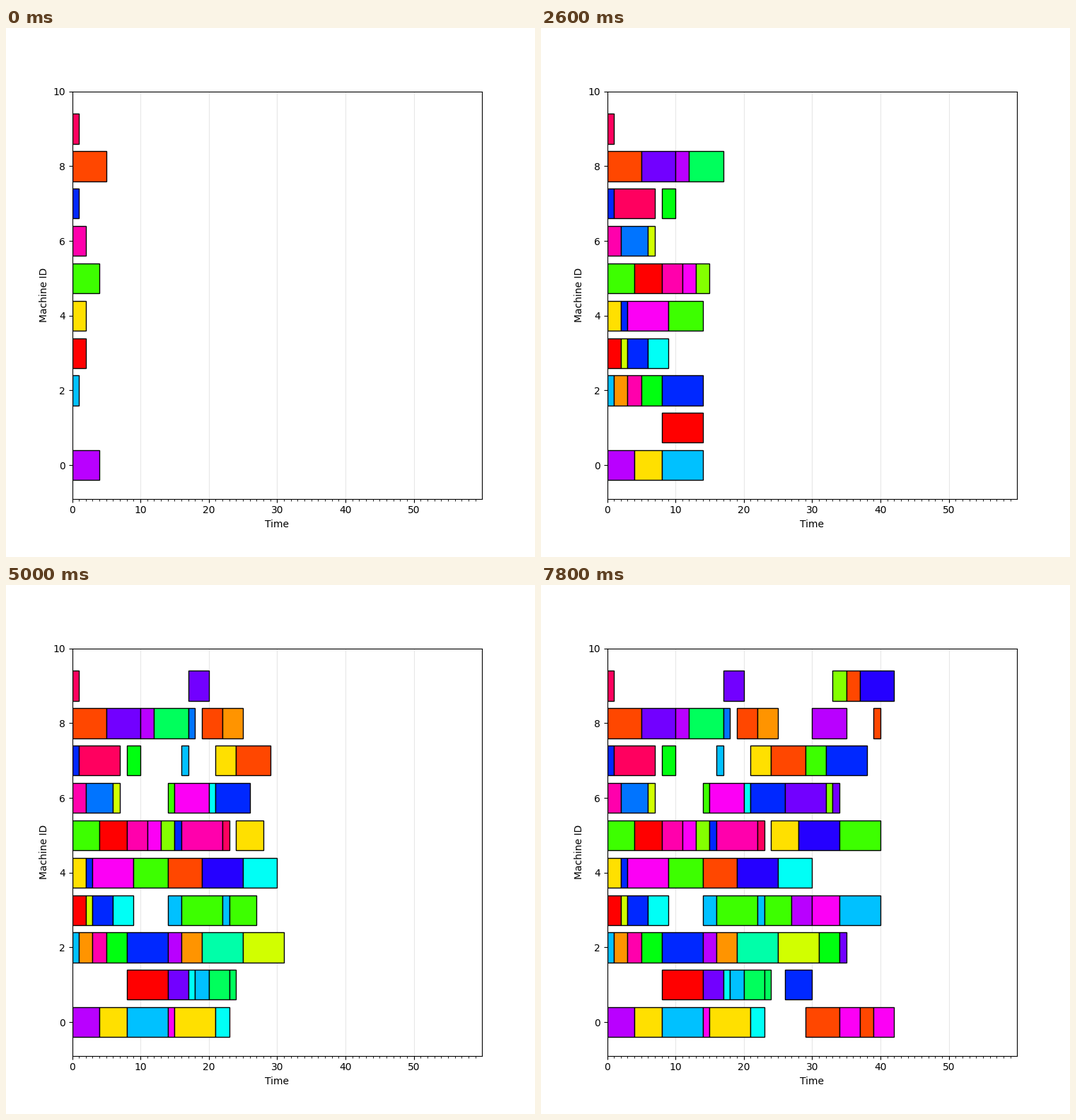
A matplotlib script that plays this animation: 748x748 px, repeating every 8 s.

```python
import matplotlib.pyplot as plt
from matplotlib.animation import FuncAnimation

FRAMES, INTERVAL = 40, 200
JOBS = 20
IDLE = None

fig, ax = plt.subplots(figsize=(7.48, 7.48), dpi=100)
cmap = plt.get_cmap("hsv")
bars = []  # (start time, patch)


def add_machine(machine, *tasks):
    """Lay (job, duration) tasks end to end on one machine's row."""
    start = 0
    for job, duration in tasks:
        if job is not IDLE:
            bar = ax.barh(machine, duration, left=start, height=0.8, zorder=2,
                          color=cmap(job / JOBS), edgecolor="black", linewidth=1)
            bars.append((start, bar[0]))
        start += duration


add_machine(0, (16, 4), (3, 4), (11, 6), (17, 1), (3, 6), (10, 2), (IDLE, 6),
            (1, 5), (17, 3), (1, 2), (17, 3))
add_machine(1, (IDLE, 8), (0, 6), (15, 3), (10, 1), (11, 2), (8, 3), (8, 1),
            (IDLE, 2), (13, 4))
add_machine(2, (11, 1), (2, 2), (18, 2), (7, 3), (13, 6), (16, 2), (2, 3),
            (9, 6), (4, 6), (7, 3), (15, 1))
add_machine(3, (0, 2), (4, 1), (13, 3), (10, 3), (IDLE, 5), (11, 2), (6, 6),
            (11, 1), (6, 4), (16, 3), (17, 4), (11, 6))
add_machine(4, (3, 2), (13, 1), (17, 6), (6, 5), (1, 5), (14, 6), (10, 5))
add_machine(5, (6, 4), (0, 4), (18, 3), (17, 2), (5, 2), (13, 1), (18, 6),
            (19, 1), (IDLE, 1), (3, 4), (14, 6), (6, 6))
add_machine(6, (18, 2), (12, 4), (4, 1), (IDLE, 7), (6, 1), (17, 5), (10, 1),
            (13, 5), (15, 6), (5, 1), (15, 1))
add_machine(7, (13, 1), (19, 6), (IDLE, 1), (7, 2), (IDLE, 6), (11, 1),
            (IDLE, 4), (3, 3), (1, 5), (6, 3), (13, 6))
add_machine(8, (1, 5), (15, 5), (16, 2), (8, 5), (12, 1), (IDLE, 1), (1, 3),
            (2, 3), (IDLE, 5), (16, 5), (IDLE, 4), (1, 1))
add_machine(9, (19, 1), (IDLE, 16), (15, 3), (IDLE, 13), (5, 2), (1, 2), (14, 5))

ax.set_axisbelow(True)
ax.set_xlim(0, 60)
ax.set_ylim(-0.9, 10)
ax.set_xticks(range(0, 60, 10))
ax.set_xticks(range(60), minor=True)
ax.set_yticks(range(0, 11, 2))
ax.grid(axis="x", which="major", alpha=0.3)
ax.set_xlabel("Time")
ax.set_ylabel("Machine ID")


def update(now):
    for start, bar in bars:
        bar.set_visible(start <= now)
    return [bar for _, bar in bars]


anim = FuncAnimation(fig, update, frames=FRAMES, init_func=lambda: update(0),
                     interval=INTERVAL, repeat=True, repeat_delay=0, blit=False)
plt.show()
```
